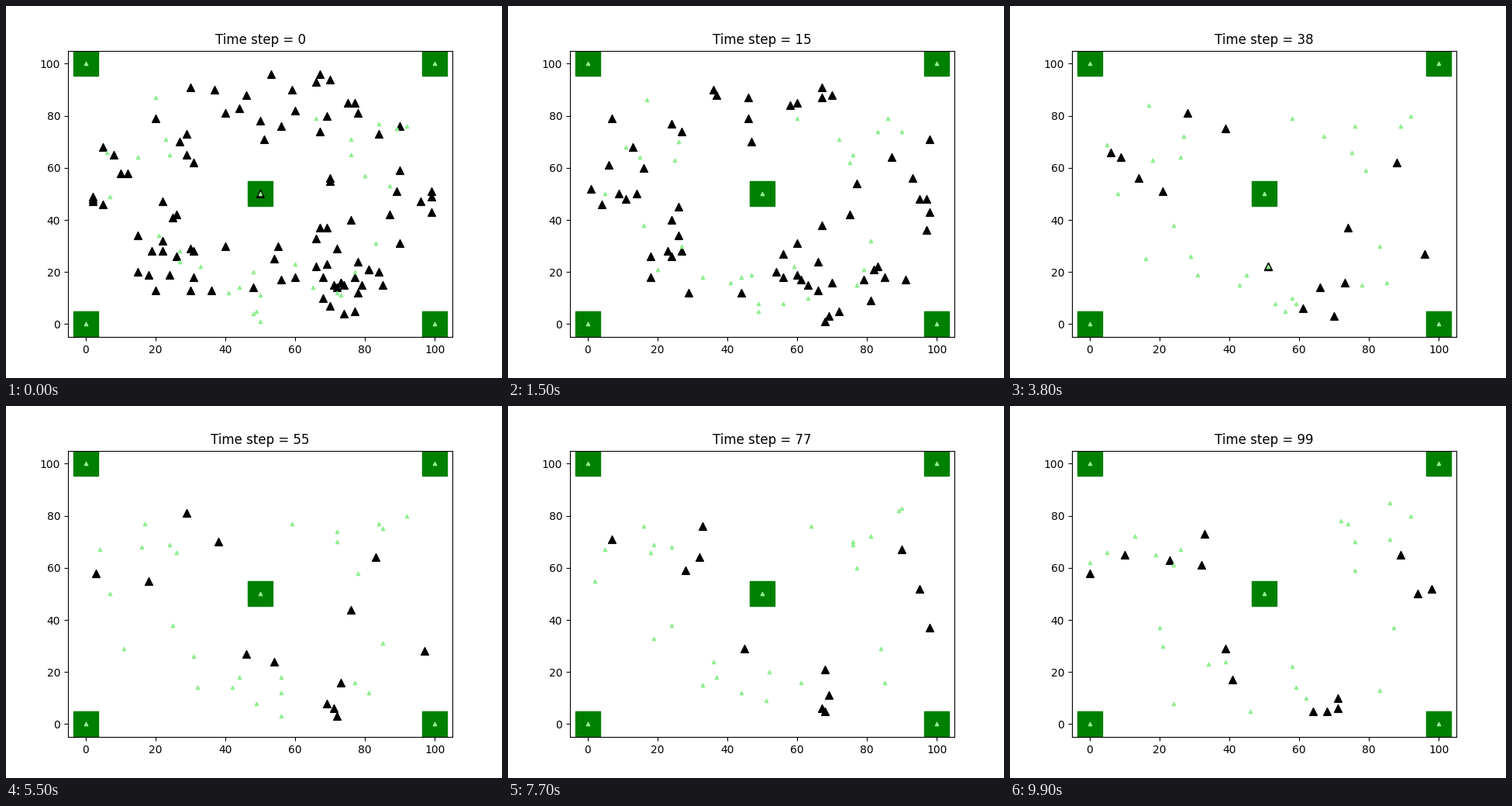
Write a matplotlib script that moves like this. It is 640x480 px and loops after 10000 ms.

```python
import matplotlib.pyplot as plt
import numpy as np
from matplotlib.animation import FuncAnimation

STEPS = 100
SIZE = 100
CENTRE = np.array([50, 50])
HOMES = np.array([(0, 0), (0, SIZE), (SIZE, 0), (SIZE, SIZE), CENTRE])
CLUMP = np.array([72, 15])
CLUMP_SHARE = 0.22
CENTRE_LEAVES = 12

rng = np.random.default_rng(7)


def keep(pos, inner, outer=52):
    """Hold positions in a ring round the centre, on whole numbers."""
    away = pos - CENTRE
    r = np.maximum(np.hypot(*away.T), 1)[:, None]
    ring = CENTRE + away * np.clip(r, inner, outer) / r
    return np.clip(np.round(ring), 0, SIZE)


def scatter_start(n, inner):
    """Spread over the ring, with some gathered in the clump."""
    angle = rng.uniform(0, 2 * np.pi, n)
    r = np.sqrt(rng.uniform(inner**2, 50**2, n))
    pos = CENTRE + np.column_stack([r * np.cos(angle), r * np.sin(angle)])
    near = CLUMP + rng.normal(0, 6, (n, 2))
    clumped = rng.random((n, 1)) < CLUMP_SHARE
    return keep(np.where(clumped, near, pos), inner)


def roam(times, counts, reach, inner):
    """Random walks; the herd's size runs through the given counts."""
    alive = np.round(np.interp(range(STEPS), times, counts)).astype(int)
    pos = scatter_start(max(counts), inner)
    places = []
    for n in alive:
        places.append(pos[:n])
        pos = keep(pos + rng.integers(-reach, reach + 1, pos.shape), inner)
    return places


hunters = roam([0, 7, 24, 38, 55, 77, 99], [92, 97, 18, 15, 13, 12, 14],
               reach=2, inner=20)
grazers = roam([0, 7, 38, 77, 99], [31, 29, 27, 24, 24], reach=1, inner=28)

fig, ax = plt.subplots(figsize=(6.4, 4.8), dpi=100)
ax.set(xlim=(-5, SIZE + 5), ylim=(-5, SIZE + 5))
ax.scatter(*HOMES.T, s=500, marker="s", color="green")
hunter_dots = ax.scatter([], [], s=50, marker="^", color="black")
grazer_dots = ax.scatter([], [], s=10, marker="^", color="lightgreen")
title = ax.set_title("Time step = 0")


def update(step):
    waiting = HOMES[-1:] if step < CENTRE_LEAVES else HOMES[:0]
    hunter_dots.set_offsets(np.vstack([hunters[step], waiting]))
    grazer_dots.set_offsets(np.vstack([grazers[step], HOMES]))
    title.set_text(f"Time step = {step}")
    return hunter_dots, grazer_dots, title


anim = FuncAnimation(fig, update, frames=STEPS, interval=100, repeat=True,
                     repeat_delay=0)
plt.show()
```
